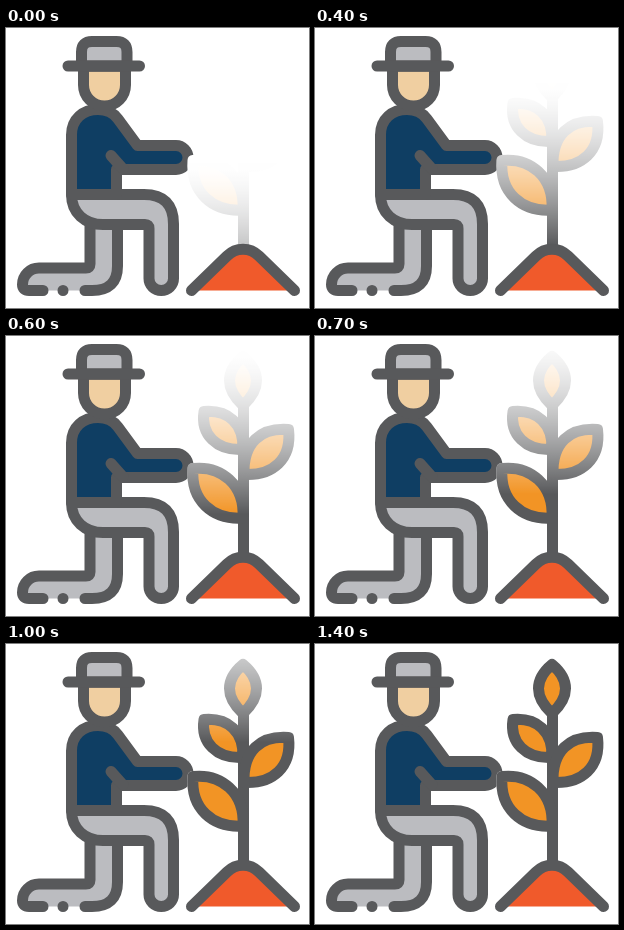
An HTML page for the animation above (1.5 s loop, 303 px wide and 280 px high).

```html
<!DOCTYPE html>
<html lang="en">
<head>
<meta charset="utf-8">
<title>Growing plant</title>
<style>
  html, body { margin: 0; width: 100%; height: 100%; overflow: hidden; background: #fff; }
  svg {
    display: block; width: 303px; height: 280px;
    --line: #58595b; --leaf: #f29425;
    stroke: var(--line); stroke-width: 11; stroke-linecap: round; stroke-linejoin: round; fill: none;
  }
  .grey { fill: #bbbcc0; }
  .skin { fill: #f0cfa1; }
  .coat { fill: #0f3e63; }
  .soil { fill: #f05a2b; }
  .leaf { fill: var(--leaf); stroke: var(--line); }
  .blank { --line: #fff; --leaf: #fff; }
</style>
</head>
<body>
<svg viewBox="0 0 303 280">
  <defs>
    <linearGradient id="fade" gradientUnits="userSpaceOnUse" x1="0" x2="0"/>
    <mask id="wipe" maskUnits="userSpaceOnUse" x="0" y="0" width="303" height="280">
      <rect width="303" height="280" fill="url(#fade)" stroke="none"/>
    </mask>
    <g id="plant" class="leaf">
      <path d="M237.5 70V222"/>
      <path d="M237 20.500C228 28 223.500 36 223.500 44.500C223.500 53 229 62 237 69.500C245 62 250.500 53 250.500 44.500C250.500 36 246 28 237 20.500Z"/>
      <path d="M198 75.500C222 73.500 238 87.500 237 113.500C210.500 115 194.500 98.500 198 75.500Z"/>
      <path d="M282.500 93.500C254.500 91.500 237 106.500 238 138.500C267 140 286 123 282.500 93.500Z"/>
      <path d="M187 132.500C215 129.500 239 148.500 237 182C206.500 184 184.500 164.500 187 132.500Z"/>
    </g>
  </defs>

  <!-- back leg -->
  <path class="grey" stroke="none" d="M84 192V236Q84 240 80 240H33A16.500 16.500 0 0 0 16.500 256.500Q16.500 262.500 23 262.500H86Q111.500 262.500 111.500 238V192Z"/>
  <path d="M84 196V236Q84 240 80 240H33A16.500 16.500 0 0 0 16.500 256.500Q16.500 262.500 23 262.500H37M57 262.500h.01M79 262.500H86Q111.500 262.500 111.500 238V196"/>
  <!-- thigh and front leg -->
  <path class="grey" d="M65.500 166.500H138Q167.500 166.500 167.500 196V250.500a12.250 12 0 0 1-24.500 0V200.500Q143 196.500 139 196.500H97C79 196.500 65.500 185 65.500 166.500Z"/>
  <!-- coat -->
  <path class="coat" d="M65.500 166.500V107C65.500 91 77 81.500 92 81.500C101 81.500 107 84 112 91L131.500 117.500H170a12 12 0 0 1 0 24H110.500V166.500Z"/>
  <path d="M105 127.500L117 141"/>
  <!-- head and hat -->
  <path class="skin" d="M77.500 38V57a21 21 0 0 0 42 0V38Z"/>
  <path class="grey" d="M75.500 38V24Q75.500 13.500 86 13.500H110.500Q121 13.500 121 24V38Z"/>
  <path d="M62 38H133.500"/>

  <use href="#plant" class="blank"/>
  <g mask="url(#wipe)"><use href="#plant"/></g>

  <!-- mound -->
  <path class="soil" d="M185.500 262.500L221 228C230 219 244 219 253 228L288.500 262.500" stroke="none"/>
  <path d="M185.500 262.500L221 228C230 219 244 219 253 228L288.500 262.500"/>
</svg>
<script>
  const LOOP = 1500, STEP = 100, START = 133, RISE = 20, SOFT = 165;
  const CURVE = 1.6, STOPS = 16;
  const fade = document.getElementById('fade');
  const origin = performance.now();

  // Opacity grows slowly at the tip of the soft edge.
  for (let i = 0; i <= STOPS; i++) {
    const stop = document.createElementNS(fade.namespaceURI, 'stop');
    stop.setAttribute('offset', i / STOPS);
    stop.setAttribute('stop-color', '#fff');
    stop.setAttribute('stop-opacity', (i / STOPS) ** CURVE);
    fade.append(stop);
  }

  // The soft edge climbs a fixed distance on every step.
  function draw(now) {
    const t = Math.max(0, now - origin) % LOOP;
    const y = START - RISE * Math.floor(t / STEP);
    fade.setAttribute('y1', y);
    fade.setAttribute('y2', y + SOFT);
    requestAnimationFrame(draw);
  }
  draw(origin);
</script>
</body>
</html>
```
